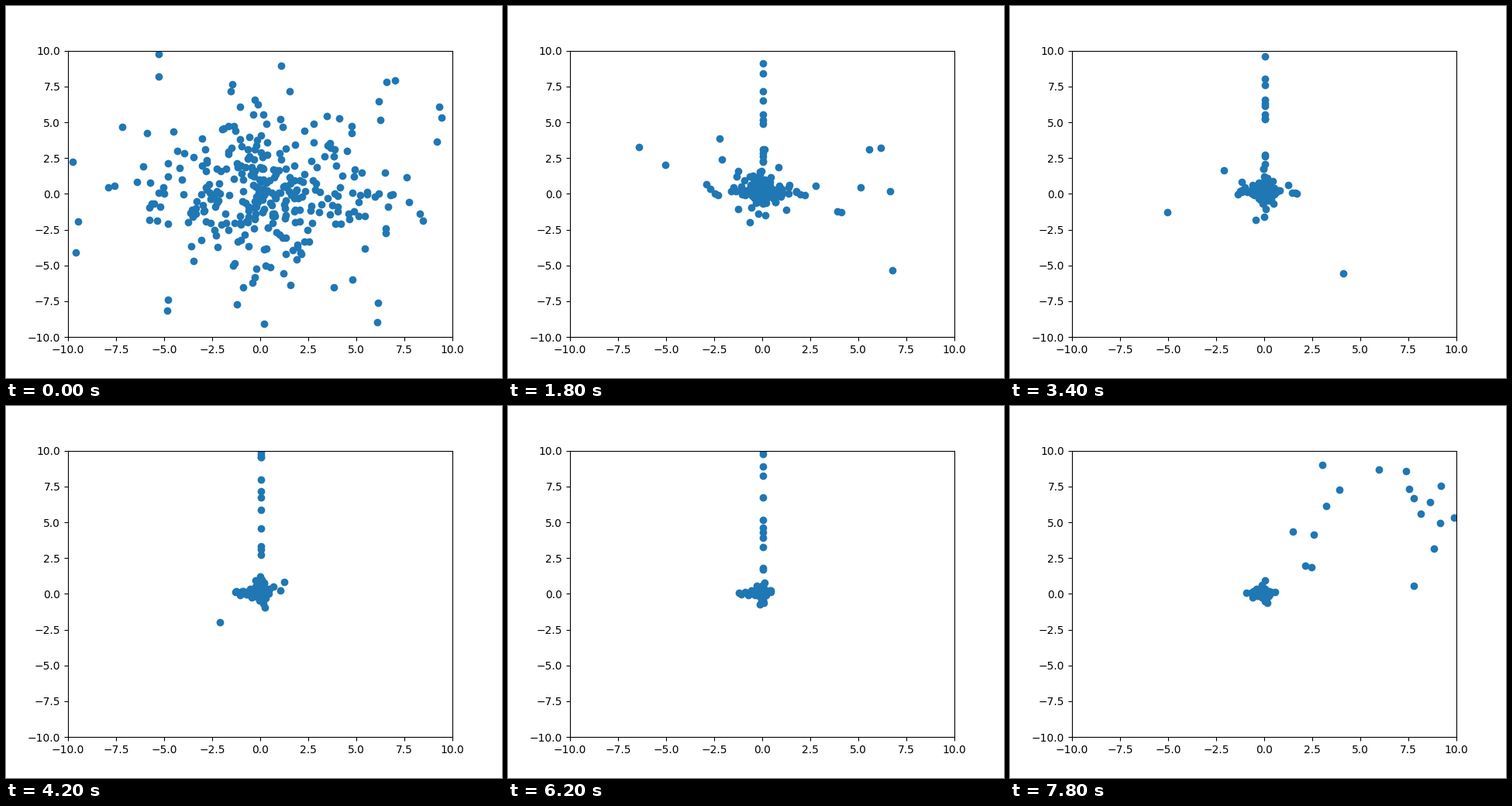
Animation of 640 by 480 pixels, one loop 8 s. Source, as a matplotlib script:

```python
import numpy as np
import matplotlib.pyplot as plt
from matplotlib.animation import FuncAnimation

FRAMES = 40
STEP_MS = 200
CORE = 300           # members that gather around the origin
STRAYS = 26          # members that linger far out
REDRAW = 0.5         # chance that a coordinate is renewed in one step
SPRAY_PHASES = (1, 5, 10, 13)


def decay(k, start, end, tau):
    """Exponential ease from start to end over the generations."""
    return end + (start - end) * np.exp(-k / tau)


def spread(k):
    return decay(k, .38, .05, 10) + decay(k, 1.2, 0, 1)


def heavy(rng, scale, n):
    """Heavy-tailed values around zero."""
    return rng.choice([-1, 1], n) * scale * rng.lognormal(0, 1.1, n)


def offspring(rng, k, n):
    """New coordinates: flat along x, leaning left as the swarm settles."""
    x = heavy(rng, spread(k), n)
    y = heavy(rng, .8 * spread(k), n) + .1
    lean = .4 * min(k / 25, 1)
    return np.column_stack([x * np.where(x > 0, 1 - lean, 1 + lean), y])


def run_core():
    """Swarm by generation; x and y are inherited independently."""
    rng = np.random.default_rng(12)
    swarm = rng.laplace((.2, 0), (2.3, 2.1), (CORE, 2))
    history = []
    for k in range(FRAMES):
        if k:
            renew = rng.random(swarm.shape) < REDRAW
            swarm = np.where(renew, offspring(rng, k, CORE), swarm)
        seen = (np.abs(swarm) < decay(k, 9.8, 1.4, 6)).all(axis=1)
        history.append(swarm[seen])
    return history


def run_strays():
    """Strays keep their x, change y now and then, and die out."""
    rng = np.random.default_rng(4)
    x = rng.uniform(-7.6, 7, STRAYS)
    y = rng.laplace(0, 2.5, STRAYS)
    history = []
    for k in range(FRAMES):
        renew = rng.random(STRAYS) < .4
        y = np.where(renew, rng.laplace(0, 2.5, STRAYS), y)
        alive = np.arange(STRAYS) < decay(k, 40, 1.5, 9)
        side = decay(k, 9.6, 4.4, 12)
        seen = alive & (np.abs(x) < side) & (np.abs(y) < side)
        history.append(np.column_stack([x, y])[seen])
    return history


def mutants(k):
    """Random jumps: a spray over the upper right, or a column along y."""
    rng = np.random.default_rng(700 + k)
    if k == 0:
        return rng.uniform(3, 9.8, (8, 2))
    if k % 17 in SPRAY_PHASES:
        return rng.uniform(.4, 9.9, (18, 2))
    y = rng.uniform(1.3, 10, 12)
    return np.column_stack([np.full(12, .03), y])


core = run_core()
strays = run_strays()


def generation(k):
    return np.vstack([core[k], strays[k], mutants(k)])


fig, ax = plt.subplots(figsize=(6.4, 4.8), dpi=100)
dots = ax.scatter(*generation(0).T)
ax.set_xlim(-10, 10)
ax.set_ylim(-10, 10)


def update(k):
    dots.set_offsets(generation(k))
    return dots,


anim = FuncAnimation(fig, update, frames=FRAMES, interval=STEP_MS,
                     repeat=True, repeat_delay=0)
plt.show()
```
